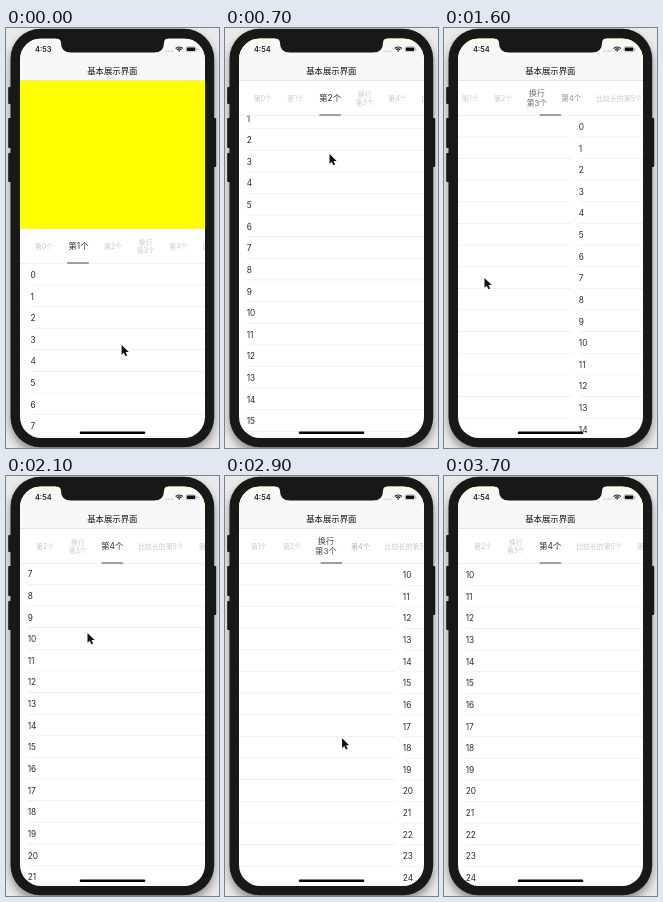
Write an HTML page with a canvas that moves like this. It is 213 px wide and 420 px high and loops after 3.8 s.

```html
<!DOCTYPE html>
<html lang="zh">
<head>
<meta charset="utf-8">
<style>
html, body { margin: 0; width: 100%; height: 100%; overflow: hidden; background: #eaeaea; }
canvas { display: block; width: 213px; height: 420px; }
</style>
</head>
<body>
<canvas id="stage"></canvas>
<script>
const LOOP = 3800, STEP = 100;
const LEFT = 14, RIGHT = 199, TOP = 10.5, BOTTOM = 410, WIDTH = RIGHT - LEFT;
const NAV = 53, BAR = 34.5, ROW = 21.63, MID = 106.3, PAD = 7.7;
const BEZEL = '#171818';
const TABS = ['第0个', '第1个', '第2个', '换行\n第3个', '第4个', '比较长的第5个', '第6个'];

// Page turns: start, duration, pages moved
const TURNS = [[80, 240, 1.015], [950, 350, 1], [1430, 400, 1], [2600, 400, -1], [3170, 480, 1]];
const PRESSES = [200, 400, 1000, 1400, 1900, 2600];
// Pointer stops: time, x, y
const STOPS = [[0, 115.6, 317], [300, 100, 300], [700, 104.5, 126], [1300, 130, 245],
  [1600, 40.5, 250], [2100, 81.5, 157], [2600, 101.5, 252], [3200, 132.6, 272.5], [3500, 60, 275]];

const canvas = document.getElementById('stage');
const ratio = window.devicePixelRatio || 1;
canvas.width = 213 * ratio;
canvas.height = 420 * ratio;
const c = canvas.getContext('2d');
c.scale(ratio, ratio);

const mix = (a, b, k) => a + (b - a) * k;
const part = (t, start, length) => Math.min(1, Math.max(0, (t - start) / length));
const smooth = k => k * k * (3 - 2 * k);
const slow = k => 1 - (1 - k) ** 2;

function rect(x, y, w, h, color) {
  c.fillStyle = color;
  c.fillRect(x, y, w, h);
}

function round(x, y, w, h, r, color) {
  c.beginPath();
  c.roundRect(x, y, w, h, r);
  c.fillStyle = color;
  c.fill();
}

function label(s, x, y, size, color, align = 'left', weight = 400) {
  c.font = `${weight} ${size}px Inter, "Noto Sans CJK SC", "Noto Sans CJK", sans-serif`;
  c.textAlign = align;
  c.fillStyle = color;
  c.fillText(s, x, y + size * 0.37);
}

function drawPage(x, top, scroll) {
  const first = Math.floor(scroll / ROW);
  for (let i = first; i < first + 17; i++) {
    const y = top + i * ROW - scroll;
    label(i, x + PAD, y + ROW / 2 + 0.5, 8.3, '#2a2a2a');
    rect(x + PAD, y + ROW - 0.5, WIDTH - PAD, 0.6, '#e8e8e8');
  }
}

function drawTabs(page, top) {
  let x = 29;
  const items = TABS.map((name, i) => {
    const on = Math.max(0, 1 - Math.abs(page - i));
    const size = mix(6.9, 8.35, on);
    const w = (name.length > 6 ? 45.8 : 17.7) * size / 6.9;
    const item = { name, on, size, mid: x + w / 2 };
    x += w + 15;
    return item;
  });
  const i = Math.floor(page);
  const line = mix(items[i].mid, items[i + 1].mid, page - i);
  const shift = Math.max(0, line - MID);

  rect(LEFT, top, WIDTH, BAR, '#fff');
  rect(LEFT, top + BAR - 0.5, WIDTH, 0.5, '#e2e2e2');
  for (const { name, on, size, mid } of items) {
    const g = Math.round(mix(200, 45, on));
    const lines = name.split('\n');
    lines.forEach((s, n) => {
      const y = top + 17.2 + (n - (lines.length - 1) / 2) * size * 1.18;
      label(s, mid - shift, y, size, `rgb(${g},${g},${g})`, 'center');
    });
  }
  rect(line - shift - 10.7, top + BAR - 1, 21.4, 1, '#444');
}

function drawStatus(t) {
  rect(LEFT, TOP, WIDTH, NAV - TOP, '#f8f8f9');
  rect(LEFT, NAV - 0.5, WIDTH, 0.5, '#d2d2d2');
  label('基本展示界面', MID, 42.7, 8.4, '#111', 'center', 500);
  label(t < 400 ? '4:53' : '4:54', 37.3, 21.5, 7.4, '#222', 'center', 600);
  for (let i = 0; i < 4; i++) round(159.5 + i * 2.2, 22.6, 1.2, 1.2, 0.6, '#aaa');
  c.strokeStyle = '#111';
  c.lineWidth = 1.2;
  for (const r of [1, 3, 5]) {
    c.beginPath();
    c.arc(173.2, 24, r, -Math.PI * 0.75, -Math.PI * 0.25);
    c.stroke();
  }
  c.lineWidth = 0.5;
  c.strokeStyle = '#888';
  c.beginPath();
  c.roundRect(180, 18.8, 10, 5, 1.4);
  c.stroke();
  round(180.8, 19.6, 8.4, 3.4, 0.8, '#111');
  rect(190.6, 20.5, 0.7, 1.7, '#888');
}

function drawBody() {
  rect(0, 0, 213, 420, '#eaeaea');
  c.save();
  c.shadowColor = 'rgba(0,0,0,.4)';
  c.shadowBlur = 9 * ratio;
  c.shadowOffsetY = 5 * ratio;
  round(4.5, 0.8, 203.7, 418.4, 30, BEZEL);
  c.restore();
  for (const [x, y, h] of [[2.2, 59, 17], [2.2, 90, 30], [2.2, 125, 29], [206.8, 90, 49]])
    round(x, y, 3.4, h, 1, BEZEL);
}

function drawNotch() {
  c.fillStyle = BEZEL;
  c.beginPath();
  c.moveTo(50, TOP - 1);
  c.lineTo(162, TOP - 1);
  c.lineTo(162, TOP);
  c.quadraticCurveTo(158, TOP, 158, 15);
  c.quadraticCurveTo(158, 24.5, 148, 24.5);
  c.lineTo(65, 24.5);
  c.quadraticCurveTo(55, 24.5, 55, 15);
  c.quadraticCurveTo(55, TOP, 50, TOP);
  c.fill();
}

function drawPointer(t) {
  const next = STOPS.findIndex(stop => stop[0] > t);
  if (next < 0) return;
  const [t0, x0, y0] = STOPS[next - 1], [t1, x1, y1] = STOPS[next];
  const k = part(t, t0, t1 - t0), x = mix(x0, x1, k), y = mix(y0, y1, k);
  if (PRESSES.some(start => t >= start && t < start + 150)) {
    c.beginPath();
    c.arc(x, y, 16.8, 0, Math.PI * 2);
    c.strokeStyle = '#111';
    c.lineWidth = 1.4;
    c.stroke();
  }
  c.save();
  c.translate(x, y);
  c.scale(0.9, 0.9);
  c.lineJoin = 'round';
  const arrow = new Path2D('M0 0V10.8L2.5 8.5L4.3 12.5L6.2 11.7L4.5 7.8H8Z');
  c.strokeStyle = '#fff';
  c.lineWidth = 1.4;
  c.stroke(arrow);
  c.fillStyle = '#111';
  c.fill(arrow);
  c.restore();
}

function draw(t) {
  const page = TURNS.reduce((p, [start, length, by]) => p + by * smooth(part(t, start, length)), 0.985);
  const bar = NAV + 148 * (1 - smooth(part(t, 300, 300)));
  const scrolls = {
    2: 30 * slow(part(t, 500, 200)),
    4: 221 * slow(part(t, 1800, 680)) - 5 * part(t, 2600, 100)
  };
  drawBody();
  c.save();
  c.beginPath();
  c.roundRect(LEFT, TOP, WIDTH, BOTTOM - TOP, 21);
  c.clip();
  rect(LEFT, TOP, WIDTH, BOTTOM - TOP, '#fff');
  for (const i of new Set([Math.floor(page), Math.ceil(page)]))
    drawPage(LEFT + (i - page) * WIDTH, bar + BAR, scrolls[i] || 0);
  rect(LEFT, bar - 148, WIDTH, 148, '#ff0');
  drawTabs(page, bar);
  drawStatus(t);
  round(73.7, 403.6, 65.6, 2.4, 1.2, '#000');
  c.restore();
  drawNotch();
  drawPointer(t);
}

function tick() {
  draw(Math.floor(performance.now() % LOOP / STEP) * STEP);
  requestAnimationFrame(tick);
}
tick();
</script>
</body>
</html>
```
